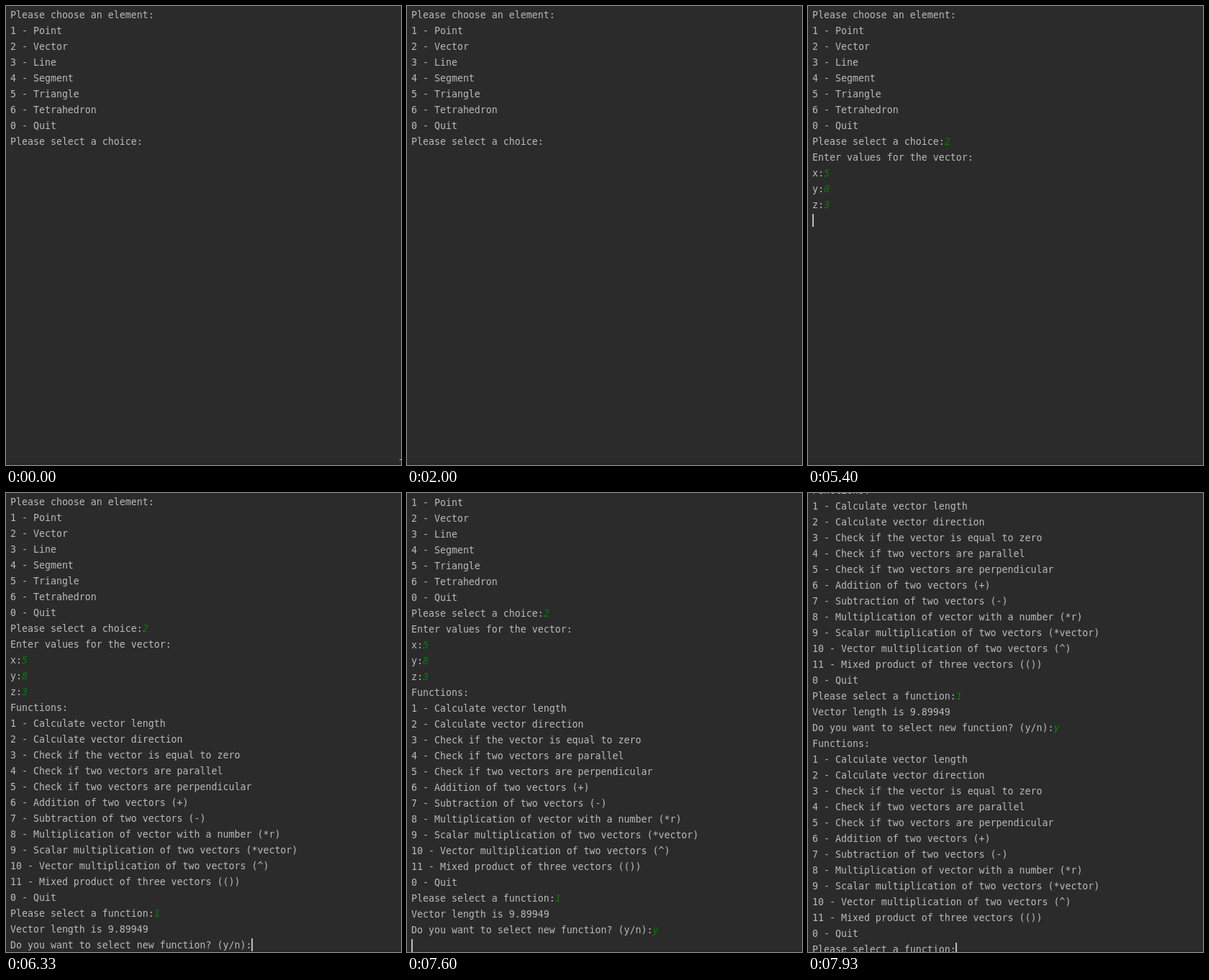
An HTML page that plays this animation: 549x638 px, repeating every 8000 ms.

```html
<!DOCTYPE html>
<html lang="en">
<head>
<meta charset="utf-8">
<title>Vector console</title>
<style>
  html, body { margin: 0; width: 100%; height: 100%; overflow: hidden; background: #2b2b2b; }
  svg { display: block; }
  text { font: 13.288px "DejaVu Sans Mono", "Noto Sans Mono", monospace; fill: #bbbbbb; white-space: pre; }
  .typed { fill: #087c08; font-style: italic; }
</style>
</head>
<body>
<svg width="549" height="638" viewBox="0 0 549 638">
  <rect width="549" height="638" fill="#2b2b2b"/>
  <rect y="636" width="549" height="2" fill="#272727"/>
  <g id="page">
    <g id="rows"></g>
    <rect id="caret" width="2" height="18" fill="#bbbbbb"/>
  </g>
  <path id="pointer" d="M0 .5h3M4 .5h3M3.5 1v14M0 15.5h3M4 15.5h3" stroke="#d4d4d4" fill="none"/>
</svg>
<script>
const LOOP = 8000, LEFT = 6, CHAR = 8, LINE = 22, BASE = 17, TICK = 1000 / 15;
const $ = id => document.getElementById(id);
const rows = $('rows'), caret = $('caret'), page = $('page'), pointer = $('pointer');

const menu = `Please choose an element:
1 - Point
2 - Vector
3 - Line
4 - Segment
5 - Triangle
6 - Tetrahedron
0 - Quit
Please select a choice:`;

const functions = `Functions:
1 - Calculate vector length
2 - Calculate vector direction
3 - Check if the vector is equal to zero
4 - Check if two vectors are parallel
5 - Check if two vectors are perpendicular
6 - Addition of two vectors (+)
7 - Subtraction of two vectors (-)
8 - Multiplication of vector with a number (*r)
9 - Scalar multiplication of two vectors (*vector)
10 - Vector multiplication of two vectors (^)
11 - Mixed product of three vectors (())
0 - Quit
Please select a function:`;

const print = (at, text) => ({ at, text });
const type = (at, text) => ({ at, text, typed: true });
const enter = at => print(at, '\n');

const session = [
  print(0, menu),
  type(3070, '2'), enter(3130),
  print(3400, 'Enter values for the vector:\nx:'),
  type(3800, '5'), enter(3930),
  print(4200, 'y:'), type(4730, '8'), enter(4800),
  print(5000, 'z:'), type(5270, '3'), enter(5400),
  print(5670, functions), type(6000, '1'), enter(6070),
  print(6330, 'Vector length is 9.89949\nDo you want to select new function? (y/n):'),
  type(7000, 'y'), enter(7600),
  print(7870, functions)
];

// [time, value] steps; the last one reached holds
const blink = [[0, 0], [470, 1], [1000, 0], [1530, 1], [2000, 0], [2530, 1],
  [3000, 0], [3070, 1], [7530, 0], [7600, 1]];
const scroll = [[0, 0], [7600, 21], [7870, 215], [7930, 302]];
const hold = (steps, t) => steps.filter(([at]) => at <= t).pop()[1];

function add(parent, tag, attrs, text) {
  const el = document.createElementNS('http://www.w3.org/2000/svg', tag);
  for (const key in attrs) el.setAttribute(key, attrs[key]);
  if (text) el.textContent = text;
  parent.appendChild(el);
  return el;
}

function move(el, x, y) {
  el.setAttribute('transform', `translate(${x} ${y})`);
}

function layout(parts) {
  rows.replaceChildren();
  let row = 0, col = 0, line;
  const newRow = () => line = add(rows, 'text', { x: LEFT, y: BASE + row * LINE });
  newRow();
  for (const { text, typed } of parts) {
    text.split('\n').forEach((piece, i) => {
      if (i) { row++; col = 0; newRow(); }
      if (piece) add(line, 'tspan', typed ? { class: 'typed' } : {}, piece);
      col += piece.length;
    });
  }
  caret.setAttribute('x', LEFT + col * CHAR - (col ? 1 : 0));
  caret.setAttribute('y', 3 + row * LINE);
}

let shown = -1;
function draw(t) {
  const parts = session.filter(part => part.at <= t);
  if (parts.length !== shown) {
    shown = parts.length;
    layout(parts);
  }
  caret.setAttribute('visibility', hold(blink, t) ? 'visible' : 'hidden');
  move(page, 0, -hold(scroll, t));

  // the mouse is sampled at 15 steps a second
  const p = Math.min(1, Math.floor((t + 4) / TICK) / 7);
  const ease = p * p * (3 - 2 * p);
  move(pointer, Math.round(547 - 170 * ease), Math.round(630 - 327 * ease));
  pointer.setAttribute('visibility', t < 1670 ? 'visible' : 'hidden');
}

const start = performance.now();
function frame() {
  draw((performance.now() - start) % LOOP);
  requestAnimationFrame(frame);
}
frame();
</script>
</body>
</html>
```
